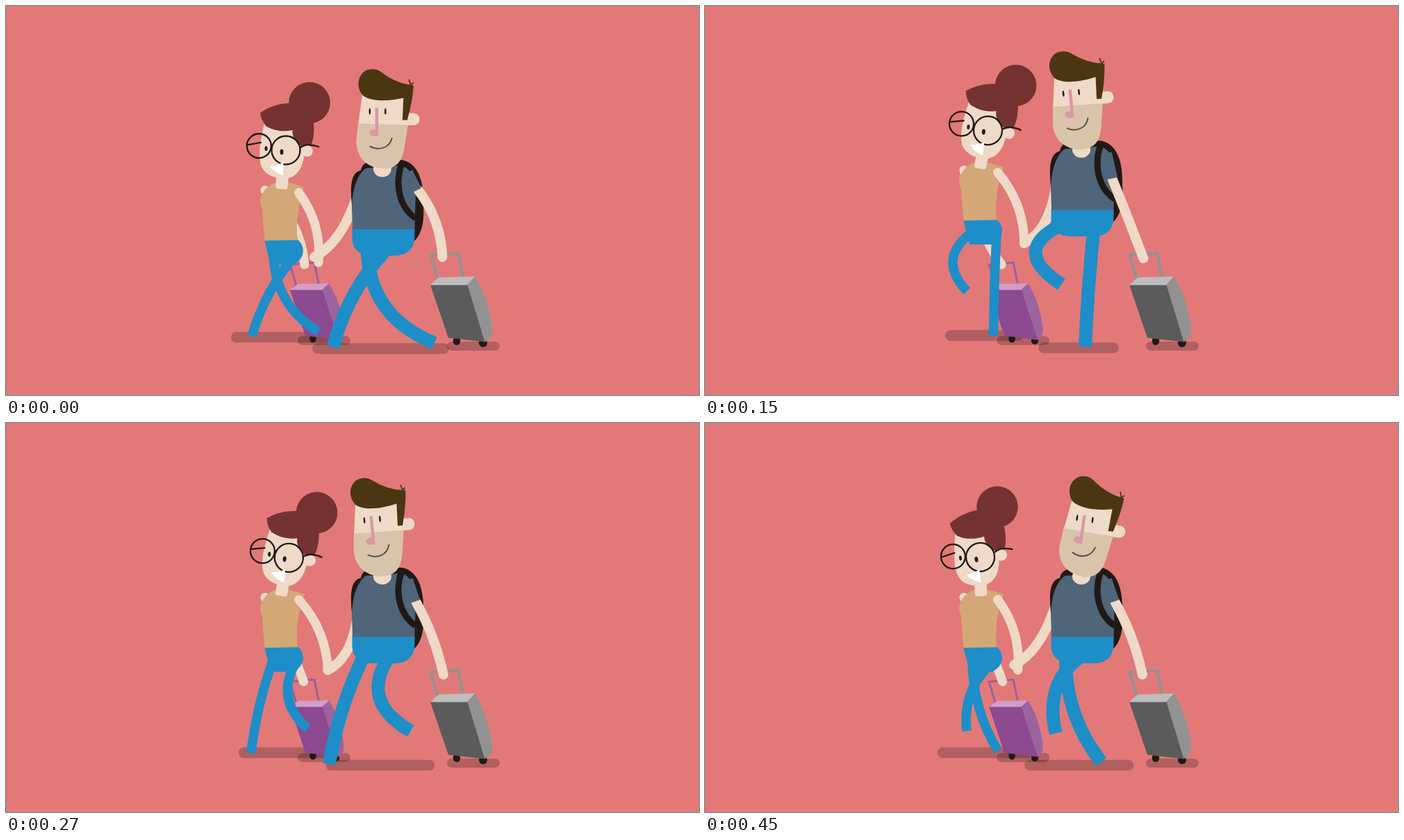
An HTML page for the animation above (480 ms loop, 998 by 561 pixels).

```html
<!DOCTYPE html>
<html lang="en">
<head>
<meta charset="utf-8">
<title>Travelling couple</title>
<style>
  html, body { margin: 0; width: 100%; height: 100%; overflow: hidden; background: #e27978; }
  svg { display: block; width: 998px; height: 561px; }
  .skin { fill: #efd9c7; }
  .limb { fill: none; stroke: #efd9c7; stroke-width: 14; stroke-linecap: round; }
  .thin { stroke-width: 13; }
  .leg { fill: none; stroke: #1d8ec7; stroke-width: 19; }
  .slim { stroke-width: 13.5; }
  .blue { fill: #1d8ec7; }
  .black { fill: #211915; }
  .wire { fill: none; stroke: #211915; stroke-width: 2.3; stroke-linecap: round; }
  .shade { fill: none; stroke: #000; stroke-opacity: .21; stroke-width: 15.5; stroke-linecap: round; }
  .small { stroke-width: 13; }
</style>
</head>
<body>
<svg viewBox="0 0 998 561">
  <path id="shadeW" class="shade"/>
  <path id="shadeM" class="shade"/>
  <path class="shade small" d="M426.5 482.5H489.5"/>
  <path class="shade small" d="M641.5 490.5H704.5"/>

  <!-- purple suitcase -->
  <g class="black"><ellipse cx="442" cy="480" rx="4.8" ry="5.5"/><ellipse cx="475" cy="482.5" rx="5.2" ry="5.5"/></g>
  <path fill="none" stroke="#9d5fa0" stroke-width="3" d="M418.5 405L409 373L444 370L451 404"/>
  <path fill="#9d639f" d="M455 409L465 400C478 420 485 445 486.5 467Q487 477 478 482Z"/>
  <path fill="#8b4990" d="M409 409H455.5L479 481.5L431 475.5Z"/>
  <path fill="#d09dcb" d="M409 409.5L420 401L465 400L455 409.5Z"/>

  <!-- grey suitcase -->
  <g class="black"><ellipse cx="649" cy="483" rx="5.3" ry="6"/><ellipse cx="687" cy="486" rx="6" ry="6"/></g>
  <path fill="none" stroke="#929292" stroke-width="4" d="M623 397L611.5 359L651 357L659.5 396"/>
  <path fill="#929292" d="M664 402L675 390C691 415 698 444 700 467Q701 479 689 484.5Z"/>
  <path fill="#5b5b5c" d="M611 402H664.5L689.5 484.5L637 478.5Z"/>
  <path fill="#bdbdbd" d="M611 402.5L623 391.5L675 390L664 402.5Z"/>

  <!-- woman -->
  <path id="caseArmW" class="limb thin"/>
  <path id="legWL" class="leg slim"/>
  <path id="legWR" class="leg slim"/>
  <g id="bodyW">
    <circle class="skin" cx="373" cy="265.5" r="6.3"/>
    <path class="blue" d="M372 337H420Q428 343 428 354Q427 366 414 373H381Z"/>
    <path fill="#d3a876" d="M390 254H406L430 261.5C421 285 417 312 420 337.5L372.5 338.5Q370 315 369 293Q363 281 369 271Q377 257 390 254Z"/>
    <g id="headW">
      <rect class="skin" x="388.5" y="235" width="17.5" height="29" rx="4" transform="rotate(5 398 256)"/>
      <path class="skin" d="M372 168C367 192 362 215 368 232C375 247 396 251 408 248C424 243 430 225 430 205L438 170Z"/>
      <circle fill="#743331" cx="437" cy="139.5" r="29.8"/>
      <path fill="#743331" d="M366 154C381 144 396 140 410 140L442 163C445 180 443 195 437 206C425 205 411 193 412.5 179C400 182 385 180 374 173Q367 164 366 154Z"/>
      <circle class="skin" cx="433.5" cy="209" r="8.3"/>
      <g class="wire">
        <circle cx="403" cy="208" r="20.5"/><circle cx="364.3" cy="201.8" r="17.5"/>
        <path d="M347.5 200.5L367 197M424 204Q432 199 439 200.5Q446 201 450 203"/>
      </g>
      <ellipse class="black" cx="374.5" cy="205.5" rx="2" ry="3.5"/>
      <ellipse class="black" cx="397" cy="210.5" rx="2.5" ry="4"/>
      <path fill="#fff" d="M380 231Q391 230 399.5 225L399 244.5Q386 240 380 231Z"/>
    </g>
  </g>
  <path id="armW" class="limb thin"/>

  <!-- man -->
  <path id="armM" class="limb"/>
  <path id="legML" class="leg"/>
  <path id="legMR" class="leg"/>
  <g id="bodyM">
    <path class="black" d="M499 296C494 255 498 240 511 237Q513 224 530 224L570 222C592 226 602 250 601 285C603 312 598 330 588 339L500 322Z"/>
    <path class="blue" d="M498.5 321H588.5V333C588 350 578 360 560 360H525Q498 358 498.5 333Z"/>
    <path fill="#50657a" d="M499 322L498 290C499 262 506 243 518 234L570 230C583 235 592 252 590 270L588.5 322Z"/>
    <path fill="none" stroke="#211915" stroke-width="9" d="M570 227C559 258 567 291 590 306"/>
  </g>
  <path id="caseArmM" class="limb"/>
  <path id="sleeve" fill="none" stroke="#50657a" stroke-width="16"/>
  <g id="topM">
    <ellipse class="skin" cx="542" cy="235" rx="13" ry="11.5"/>
    <g id="headM">
      <path class="skin" d="M514 122L507 172H579L584 122Z"/>
      <path fill="#dac3ab" d="M507 169.5L579 171.5L574.5 200C572 220 565 233 548 234.5C525 236 505 222 504.5 196Z"/>
      <path class="skin" d="M574 154.5H587A8.7 8.7 0 0 1 587 172H579Z"/>
      <path fill="#4b3614" d="M514 129C503 116 507 97 521 92Q532 89 540 95Q562 112 587 114.5Q586 136 578 164.500H571L572.5 132.5C550 138 526 138 514 129Z"/>
      <path fill="none" stroke="#4b3614" stroke-width="1.800" d="M580.5 106L583 114L587 110.5"/>
      <ellipse class="black" cx="524" cy="152" rx="1.3" ry="4.5"/>
      <ellipse class="black" cx="546.5" cy="152" rx="1.3" ry="4.5"/>
      <g fill="#d899a0"><path d="M531.8 147H536.3V188H531.8Z"/><ellipse cx="529.5" cy="183" rx="6" ry="5"/></g>
      <path fill="none" stroke="#55504f" stroke-width="2" d="M524 202C536 209 552 206 556 190"/>
    </g>
  </g>
</svg>
<script>
const STEP = 30, STEPS = 16, HALF = STEPS / 2;

const man = { ground: 492, lift: 95, fold: 42, sway: 0 };
const woman = { ground: 476, lift: 68, fold: 25, sway: 5 };

const el = id => document.getElementById(id);
const draw = (id, d) => el(id).setAttribute('d', d);
const place = (id, v) => el(id).setAttribute('transform', v);
const curve = (a, c, b) => `M${a}Q${c} ${b}`;
const shade = (id, l, r, y) => draw(id, `M${l + 7.75} ${y}H${r - 7.75}`);

// Curve from a to b, bulging sideways by h
function bow(a, b, h) {
  const dx = b[0] - a[0], dy = b[1] - a[1], s = 2 * h / Math.hypot(dx, dy);
  return curve(a, [(a[0] + b[0]) / 2 - dy * s, (a[1] + b[1]) / 2 + dx * s], b);
}

// Stride position: -1 foot in front, 0 passing, 1 foot behind
function swing(k) {
  const p = k % STEPS, w = p < HALF ? p / 4 - 1 : 3 - p / 4;
  return Math.sign(w) * Math.abs(w) ** 2.2;
}

// 1 at ground contact, 0 at the top of the stride
const bounce = k => Math.abs(swing(k));

function leg(id, hip, centre, stride, k, { ground, lift, fold, sway }) {
  const e = swing(k), pass = 1 - Math.abs(e), raised = k % STEPS > HALF;
  const foot = [
    centre + stride * e + (raised ? -sway : sway) * pass,
    ground - (raised ? lift * pass : 0) - 6 * Math.max(0, e)
  ];
  const bend = (e > 0 ? .72 : -.3) * e + (raised ? pass : 0);
  draw(id, bow(hip, foot, fold * bend));
}

function render(k) {
  const b = bounce(k), near = Math.cos(Math.PI * k / HALF);
  const yM = -29 * (1 - b), yW = -30.5 * (1 - b);
  const tilt = -9.2 + 17.2 * bounce(k + 1);

  place('bodyM', `translate(0 ${yM})`);
  place('topM', `translate(0 ${yM})`);
  place('bodyW', `translate(0 ${yW})`);
  place('headM', `rotate(${tilt} 541 236)`);
  place('headW', `rotate(${-tilt * .97} 398 256)`);

  leg('legMR', [561, 338 + yM], 544, 73, k, man);
  leg('legML', [520, 340 + yM], 518, 99, k + HALF, man);
  leg('legWR', [420, 355 + yW], 408, 54, k, woman);
  leg('legWL', [385, 355 + yW], 385, 65, k + HALF, woman);

  // Joined hands slip apart a little on the near side
  const slip = Math.max(0, near);
  const hand = [457 - 7 * near, 370 + yM];
  const [hx, hy] = [hand[0] - 6 * slip, hand[1] - 8 * slip];
  draw('armW', bow([421.5, 269 + yW], hand, -10));
  draw('armM', curve([508, 265 + yM], [hx + 42, hy - 22], [hx, hy]));

  // Arms pulling the suitcases
  const cuff = [586 + 5 * b, 277 + yM - 11 * b];
  draw('caseArmW', curve([373, 266 + yW], [394 + 31 * b, 333 - 23 * b], [427 + 3 * b, 373]));
  draw('caseArmM', bow([cuff[0] + 3 * b, cuff[1]], [631.5 - 3 * b, 364 - 2 * b], -8 * b));
  draw('sleeve', `M578 ${240 + yM}L${cuff}`);

  shade('shadeW', 347 - 23 * b, 457 + 28 * b, 475.3 + 2.5 * b ** 5);
  shade('shadeM', 482 - 41 * b, 594 + 44 * b, 493 + b);
}

function tick() {
  render(Math.floor(performance.now() / STEP) % STEPS);
  requestAnimationFrame(tick);
}
tick();
</script>
</body>
</html>
```
